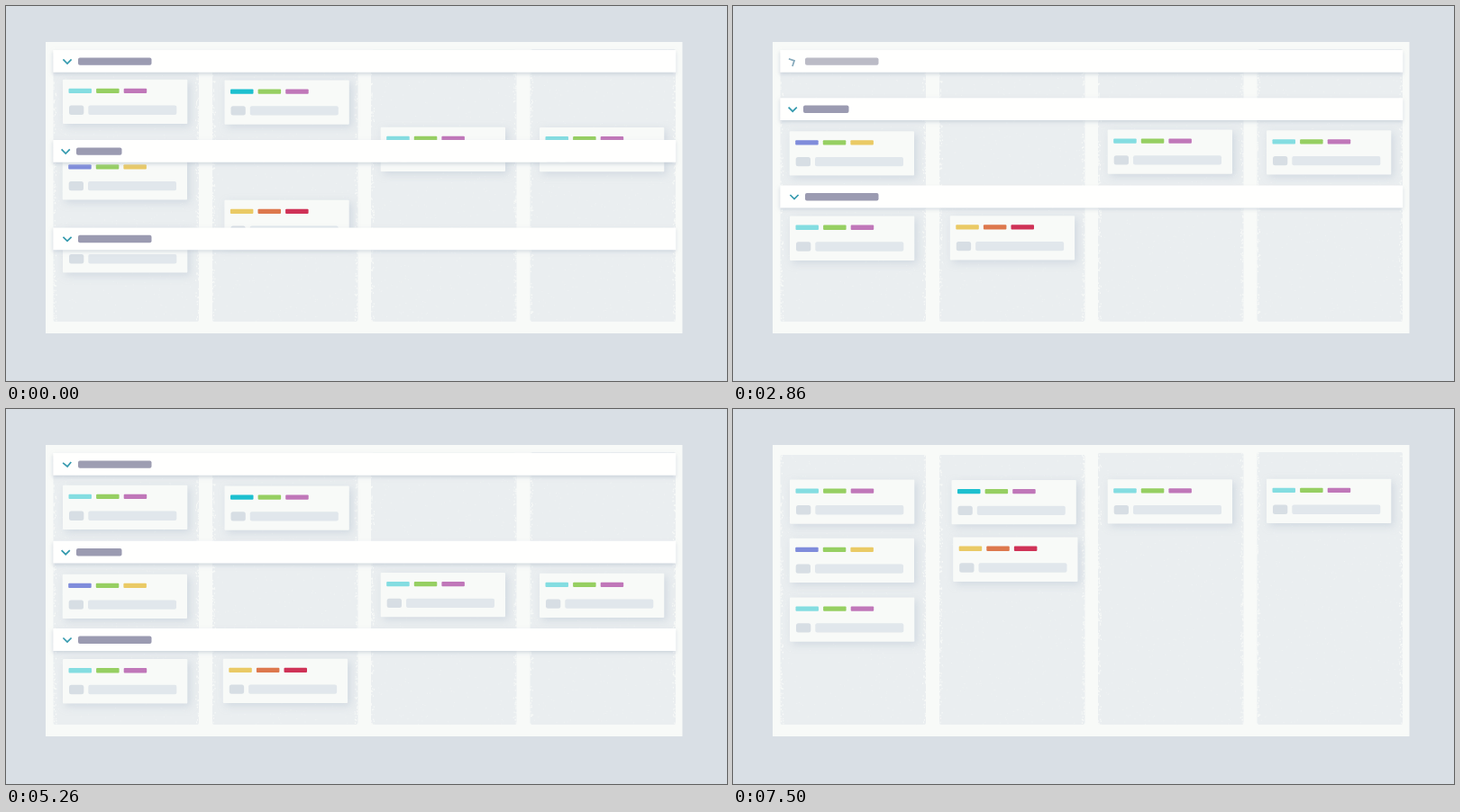
Recreate the animation shown at these times as an HTML page with a canvas. Size 800 by 417 pixels, loop 9360 ms.

```html
<!DOCTYPE html>
<html lang="en">
<head>
<meta charset="utf-8">
<title>Board with swimlanes</title>
<style>
  html, body { margin: 0; width: 100%; height: 100%; overflow: hidden; background: #d9dfe5; }
  canvas { display: block; width: 100vw; height: 100vh; }
</style>
</head>
<body>
<canvas id="stage" width="800" height="417"></canvas>
<script>
const LOOP = 9360;
const PANEL = '#f8faf8';
const stage = document.getElementById('stage');
const ctx = stage.getContext('2d');

const CYAN = '#84dde1', TEAL = '#1dc0cf', GREEN = '#96cf62', PURPLE = '#c077b9';
const BLUE = '#7f8cdb', YELLOW = '#eaca65', ORANGE = '#dd784d', RED = '#cf3257';

// Each card moves from its place on the plain board to its place in a lane.
const cards = [
  { lane: 0, from: [63, 78.4], to: [63, 84.8], tags: [CYAN, GREEN, PURPLE] },
  { lane: 0, from: [242.5, 79], to: [242.5, 85.5], tags: [TEAL, GREEN, PURPLE] },
  { lane: 1, from: [62.7, 143.7], to: [62.7, 186], tags: [BLUE, GREEN, YELLOW] },
  { lane: 1, from: [415.7, 78.2], to: [415.7, 184.3], tags: [CYAN, GREEN, PURPLE] },
  { lane: 1, from: [592, 77.8], to: [592, 185], tags: [CYAN, GREEN, PURPLE] },
  { lane: 2, from: [63, 209.5], to: [63, 280.4], tags: [CYAN, GREEN, PURPLE] },
  { lane: 2, from: [244.2, 142.6], to: [240.8, 280], tags: [YELLOW, ORANGE, RED] }
];
const lanes = [
  { y: 49, icon: 68, label: [80, 81.5] },
  { y: 149, icon: 66.2, label: [78, 50.5] },
  { y: 246.4, icon: 68, label: [80, 81.5] }
];
const columns = [[52.5, 51], [229, 51], [405, 48.7], [581.5, 48]];

const lerp = (a, b, p) => a + (b - a) * p;
const span = (t, start, end) => Math.min(1, Math.max(0, (t - start) / (end - start)));
const inOut = u => u < 0.5 ? 4 * u ** 3 : 1 - 4 * (1 - u) ** 3;
const mix = (a, b, p) => `rgb(${a.map((v, i) => Math.round(lerp(v, b[i], p)))})`;

function box(c, x, y, w, h, color, radius = 0) {
  c.fillStyle = color;
  c.beginPath();
  c.roundRect(x, y, w, h, radius);
  c.fill();
}

function withShadow(color, blur, dx, dy, draw) {
  ctx.save();
  ctx.shadowColor = color;
  ctx.shadowBlur = blur;
  ctx.shadowOffsetX = dx;
  ctx.shadowOffsetY = dy;
  draw();
  ctx.restore();
}

// Panel with four grainy columns, painted once.
function paintBoard() {
  const board = document.createElement('canvas');
  board.width = 800;
  board.height = 417;
  const c = board.getContext('2d');
  let seed = 7;
  const random = () => (seed = seed * 16807 % 2147483647) / 2147483647;
  box(c, 0, 0, 800, 417, '#d9dfe5');
  box(c, 44, 40, 706.5, 324, PANEL);
  for (const [x, top] of columns) {
    const height = 351 - top;
    box(c, x, top, 161.5, height, '#eaeef0', 2);
    for (let i = 0; i < 500; i++) {
      box(c, x + random() * 161, top + random() * height, 1, 1, 'rgba(248,250,248,.4)');
    }
    for (let i = 0; i < 260; i++) {
      const inset = random() ** 2 * 3;
      const px = i % 2 ? x + inset : x + 160.5 - inset;
      box(c, px, top + random() * height, 1, 1.5, PANEL);
    }
  }
  return board;
}
const board = paintBoard();

function drawCard(x, y, tags) {
  withShadow('rgba(186,197,212,.5)', 9, 3, 3, () => box(ctx, x, y, 138.3, 49.3, PANEL, 1));
  tags.forEach((color, i) => box(ctx, x + 6.5 + i * 30.6, y + 10, 25.5, 5.3, color, 1));
  box(ctx, x + 7, y + 28.7, 16.3, 10.4, '#d7dee4', 2.5);
  box(ctx, x + 28.3, y + 28.7, 98, 10.4, '#e1e7ec', 2);
}

function drawLane({ y, icon, label }, lift, fold) {
  const top = y - lift;
  withShadow('rgba(180,192,205,.55)', 4, 0, 2, () => box(ctx, 52.3, top, 691, 24.8, '#fffffe'));
  box(ctx, label[0], top + 8.4, label[1], 8.4, mix([155, 155, 177], [205, 205, 209], fold), 2);
  ctx.save();
  ctx.translate(icon - 3 * fold, top + 12.8);
  ctx.rotate(-Math.PI * fold);
  ctx.beginPath();
  ctx.moveTo(-4.6, -2.4);
  ctx.lineTo(0, 2.2);
  ctx.lineTo(4.6, -2.4);
  ctx.strokeStyle = mix([52, 154, 174], [176, 175, 192], fold);
  ctx.lineWidth = 1.7;
  ctx.stroke();
  ctx.restore();
}

function render(t) {
  const spread = inOut(0.51 + 0.49 * span(t, 0, 400)) - inOut(span(t, 7030, 7500));
  const fold = inOut(span(t, 2564, 3100)) - inOut(span(t, 4500, 5450));
  const slide = t < 4330 ? 74 * inOut(span(t, 2200, 2820)) : 0;
  const laneAlpha = 1 - span(t, 7030, 7270);
  const lift = 72.5 * fold;

  ctx.drawImage(board, 0, 0);
  for (const { lane, from, to, tags } of cards) {
    if (lane === 0 && slide === 74) continue;
    ctx.save();
    if (lane === 0 && slide > 0) {
      ctx.beginPath();
      ctx.rect(0, 62, 800, 355);
      ctx.clip();
    }
    const y = lerp(from[1], to[1], spread) - (lane ? lift : slide);
    drawCard(lerp(from[0], to[0], spread), y, tags);
    ctx.restore();
  }
  if (laneAlpha > 0) {
    ctx.globalAlpha = laneAlpha;
    lanes.forEach((lane, i) => drawLane(lane, i ? lift : 0, i ? 0 : fold));
    ctx.globalAlpha = 1;
  }
}

const began = performance.now();
function tick() {
  render((performance.now() - began) % LOOP);
  requestAnimationFrame(tick);
}
tick();
</script>
</body>
</html>
```
